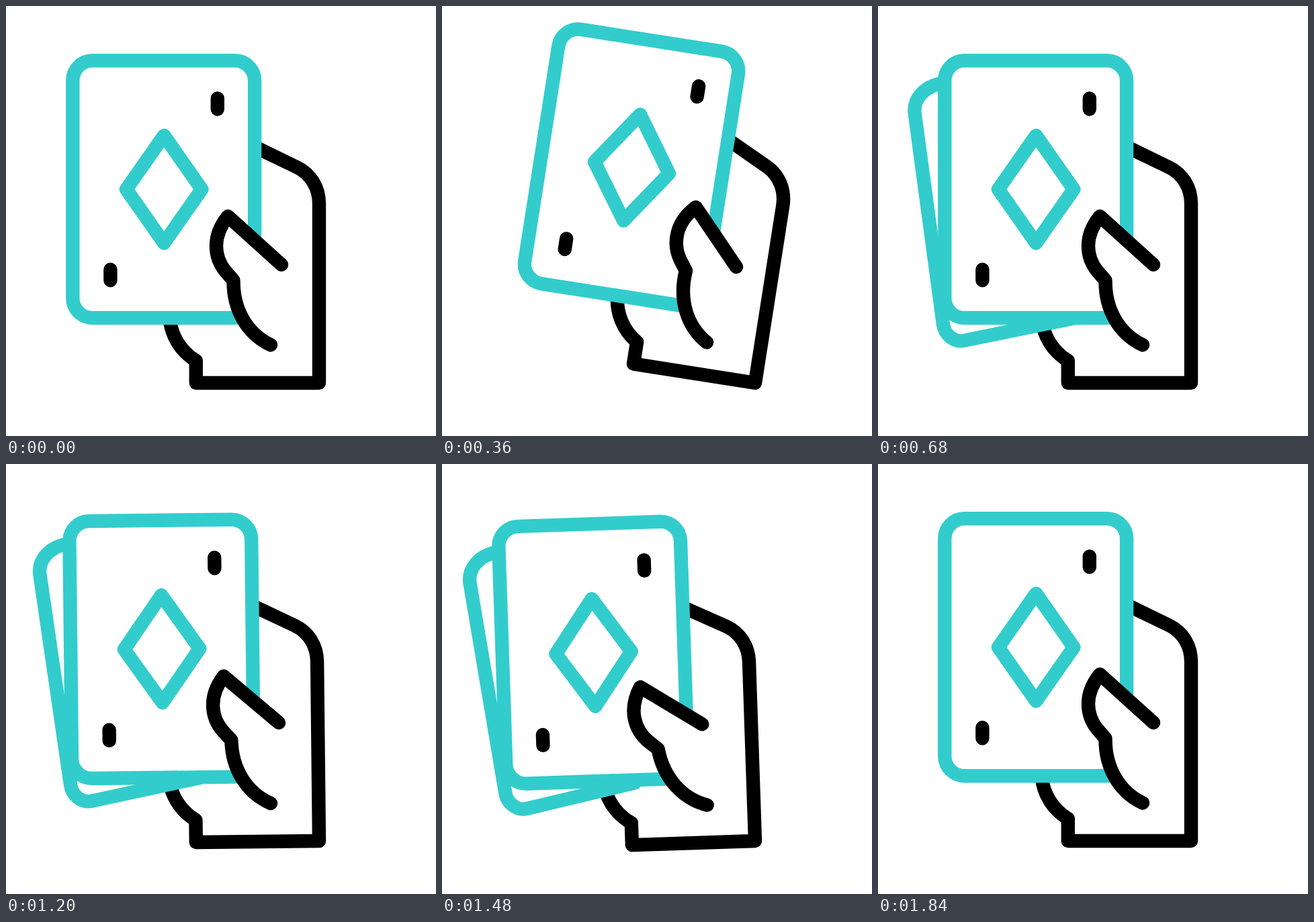
An HTML page that plays this animation: 640 px wide and 640 px high, repeating every 2 s.

```html
<!DOCTYPE html>
<html lang="en">
<head>
<meta charset="utf-8">
<title>Hand with cards</title>
<style>
html, body { margin: 0; width: 100%; height: 100%; overflow: hidden; background: #fff; }
svg { display: block; width: 100%; height: 100%; }
svg * { stroke-width: 20.4; stroke-linecap: round; stroke-linejoin: round; }
.ink { stroke: #000; }
.teal { stroke: #3cc; }
</style>
</head>
<body>
<svg viewBox="0 0 640 640" fill="none">
  <g id="hand">
    <path class="ink" d="M243.5 465C246 491 260 514 282.8 528V561H466V294C466 271 454 250.500 434 240.500L369 209"/>
    <path id="back" class="teal" d="M99 114.500C70 118 51 138 55 162L97 474C99 488 112 501 128 498L290 465"/>
    <rect class="teal" x="99.300" y="81.300" width="270.800" height="383" rx="29.500" fill="#fff"/>
    <path class="teal" d="M235.200 192.700L291.300 272.800L235.200 352.800L179 272.800Z"/>
    <path class="ink" d="M314.800 137.500V153.600M155.400 392.300V408.300"/>
  </g>
  <path id="thumb" class="ink" fill="#fff" d="M410 385L330.300 313C319 327 313 342 313 357C313 371 318 384 326 394L338.500 408.500C338 452 359 488 394 504.500"/>
</svg>
<script>
const LOOP = 2000;
const part = id => document.getElementById(id);
const hand = part('hand'), back = part('back'), thumb = part('thumb');

// Smooth step from 0 to 1 between two times
function ease(t, start, end) {
  const p = Math.min(1, Math.max(0, (t - start) / (end - start)));
  return p * p * (3 - 2 * p);
}

// Rises to 1 at the peak, then falls back to 0
const pulse = (t, start, peak, end) => ease(t, start, peak) - ease(t, peak, end);

function place(el, angle, x, y, drop = 0) {
  el.setAttribute('transform', `translate(0 ${drop}) rotate(${angle} ${x} ${y})`);
}

function draw() {
  const t = performance.now() % LOOP;
  const right = pulse(t, 120, 360, 480) + pulse(t, 1400, 1600, 1840);
  const left = pulse(t, 360, 480, 680) + pulse(t, 1160, 1400, 1600);
  const tuck = 1 - ease(t, 480, 680) + ease(t, 1480, 1600);

  place(hand, 8.9 * right - 8 * left, 466, 561);
  place(thumb, 13.8 * right - 25.2 * left, 410, 502.6);
  place(back, 9 * tuck, 307, 398, 10 * ease(t, 1400, 1600));
  back.style.visibility = t >= 475 && t < 1600 ? 'visible' : 'hidden';
  requestAnimationFrame(draw);
}
draw();
</script>
</body>
</html>
```
